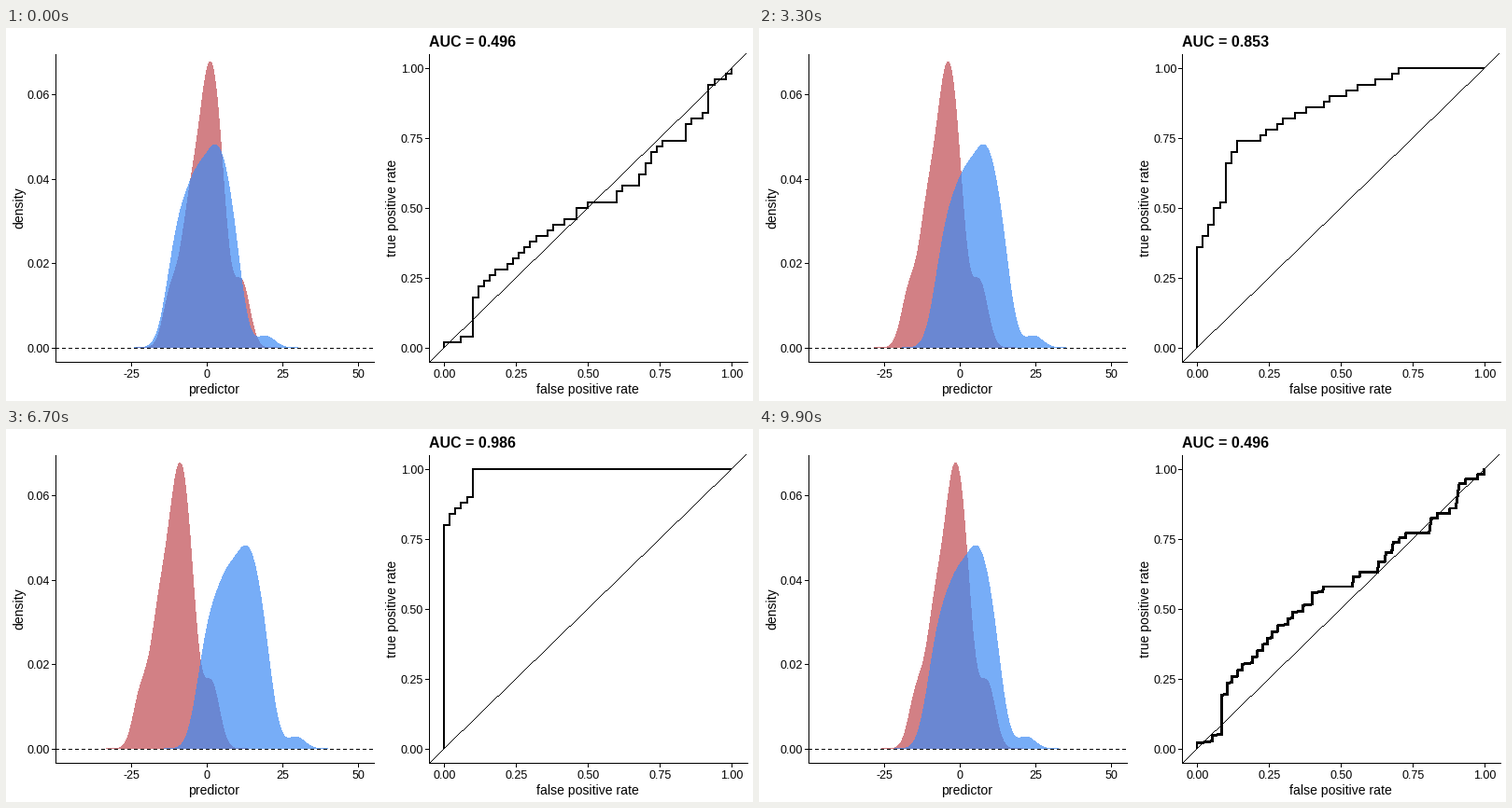
These frames come from a looping animation (800x400 px, 10 s). A matplotlib script:

```python
import numpy as np
import matplotlib.pyplot as plt
from matplotlib.animation import FuncAnimation
from matplotlib.patches import Polygon

W, H, DPI = 800, 400, 100
PX = 72 / DPI                       # one pixel in points
FRAMES, STEP_MS = 100, 100
STARTS = [9, 26, 43, 60, 77, 93]    # first frame of each transition
STEPS = 8
SHIFTS = 2.5 * np.array([0, 1, 2, 3, 4, 8])
AUCS = [0.496, 0.694, 0.853, 0.950, 0.986, 1.0]

# Scores of the two groups of 50, best first, as key points rank: score
NEGATIVE = {1: 13, 5: 10.1, 6: 6.5, 8: 5.35, 12: 4, 16: 2.6, 23: 1.2, 24: 0.6,
            34: -1.9, 35: -2.75, 38: -4.4, 42: -5.6, 43: -7, 46: -7.7,
            47: -10.7, 50: -12.8}
POSITIVE = {1: 19.5, 2: 10.9, 3: 9.8, 8: 7.6, 9: 6.8, 13: 5.2, 16: 3.8,
            25: 0.85, 26: 0.15, 27: -1, 29: -1.3, 30: -2.2, 37: -4.5,
            38: -5.8, 43: -8.15, 47: -10.55, 50: -12.9}

plt.rcParams["font.family"] = "Liberation Sans"
fig = plt.figure(figsize=(W / DPI, H / DPI), dpi=DPI, facecolor="white")
ax = fig.add_axes([0, 0, 1, 1])
ax.set(xlim=(0, W), ylim=(H, 0))
ax.axis("off")


def predictor_x(v):
    return 215 + 3.24 * v


def density_y(v):
    return 343 - 4533 * v


def rate_x(v):
    return 469 + 308 * v


def rate_y(v):
    return 343 - 300 * v


def line(x, y, width=1, **kw):
    kw = {"color": "black", "solid_capstyle": "butt", "antialiased": False, **kw}
    return ax.plot(x, y, lw=width * PX, **kw)[0]


def label(x, y, text, size, **kw):
    kw = {"ha": "center", "va": "baseline", **kw}
    return ax.text(x, y, text, fontsize=size * PX, rotation_mode="anchor", **kw)


def panel(left, xticks, to_x, yticks, to_y, xname, yname):
    line([left, left], [28, 358])
    line([left, left + 341], [358, 358])
    for v in xticks:
        x = round(to_x(v))
        line([x, x], [358, 362])
        label(x + 0.5, 375, f"{v}", 12.5)
    for v in yticks:
        y = round(to_y(float(v)))
        line([left - 4, left], [y, y])
        label(left - 6, y + 5, v, 12.5, ha="right")
    label(left + 170, 392, xname, 14)
    label(left - 35, 193, yname, 14, rotation=90)


def scores(keys):
    return np.interp(np.arange(1, 51), list(keys), list(keys.values()))


def roc_curve(shift):
    """Walk down the sorted scores: up for a positive, right for a negative."""
    order = np.argsort(-np.concatenate([pos + shift, neg - shift]), kind="stable")
    right = np.concatenate([[0], np.cumsum(order >= len(pos))])
    up = np.arange(len(right)) - right
    return np.array([right, up]) / len(pos)


def density(data):
    """Gaussian kernel density with the rule-of-thumb bandwidth."""
    q1, q3 = np.percentile(data, [25, 75])
    bw = 0.9 * min(data.std(ddof=1), (q3 - q1) / 1.34) * len(data) ** -0.2
    z = (grid[:, None] - data) / bw
    return np.exp(-z ** 2 / 2).mean(axis=1) / (bw * np.sqrt(2 * np.pi))


def hump(color):
    shape = Polygon([(0, 0), (1, 0), (0, 1)], closed=True, lw=0, alpha=0.7,
                    facecolor=[c / 255 for c in color], antialiased=False)
    return ax.add_patch(shape)


def outline(heights, shift):
    x = predictor_x(grid + shift)
    top = np.column_stack([x, density_y(heights)])
    return np.vstack([top, [(x[-1], 343), (x[0], 343)]])


neg, pos = scores(NEGATIVE), scores(POSITIVE)
curves = [roc_curve(s) for s in SHIFTS]
grid = np.linspace(-24, 30, 400)
red_h, blue_h = density(neg), density(pos)

red = hump((191, 74, 82))
blue = hump((62, 139, 244))
line([53, 394], [343, 343], dashes=(4, 4), dash_capstyle="butt")

panel(53, [-25, 0, 25, 50], predictor_x,
      ["0.00", "0.02", "0.04", "0.06"], density_y, "predictor", "density")
quarters = [f"{i / 4:.2f}" for i in range(5)]
panel(453, quarters, lambda v: rate_x(float(v)),
      quarters, rate_y, "false positive rate", "true positive rate")

# Chance line, one pixel per column
cols = np.arange(454, 793)
ax.plot(cols, np.round(rate_y((cols - 469) / 308)), ",", color="black",
        antialiased=False)
roc = line([], [], 2, solid_joinstyle="miter")
title = label(453, 20, "", 16, ha="left", weight="bold")


def draw(n):
    i = sum(s <= n for s in STARTS)
    a, b, f = 0, 0, 0
    if i:
        a, b = i - 1, i % len(curves)
        f = min((n - STARTS[a] + 1) / STEPS, 1)
    shift = SHIFTS[a] + (SHIFTS[b] - SHIFTS[a]) * f
    red.set_xy(outline(red_h, -shift))
    blue.set_xy(outline(blue_h, shift))
    x, y = curves[a] + (curves[b] - curves[a]) * f
    roc.set_data(rate_x(x), rate_y(y))
    title.set_text(f"AUC = {AUCS[b if f >= 0.5 else a]:.3f}")
    return red, blue, roc, title


anim = FuncAnimation(fig, draw, frames=FRAMES, interval=STEP_MS,
                     init_func=lambda: draw(0), repeat=True, repeat_delay=0)
plt.show()
```
